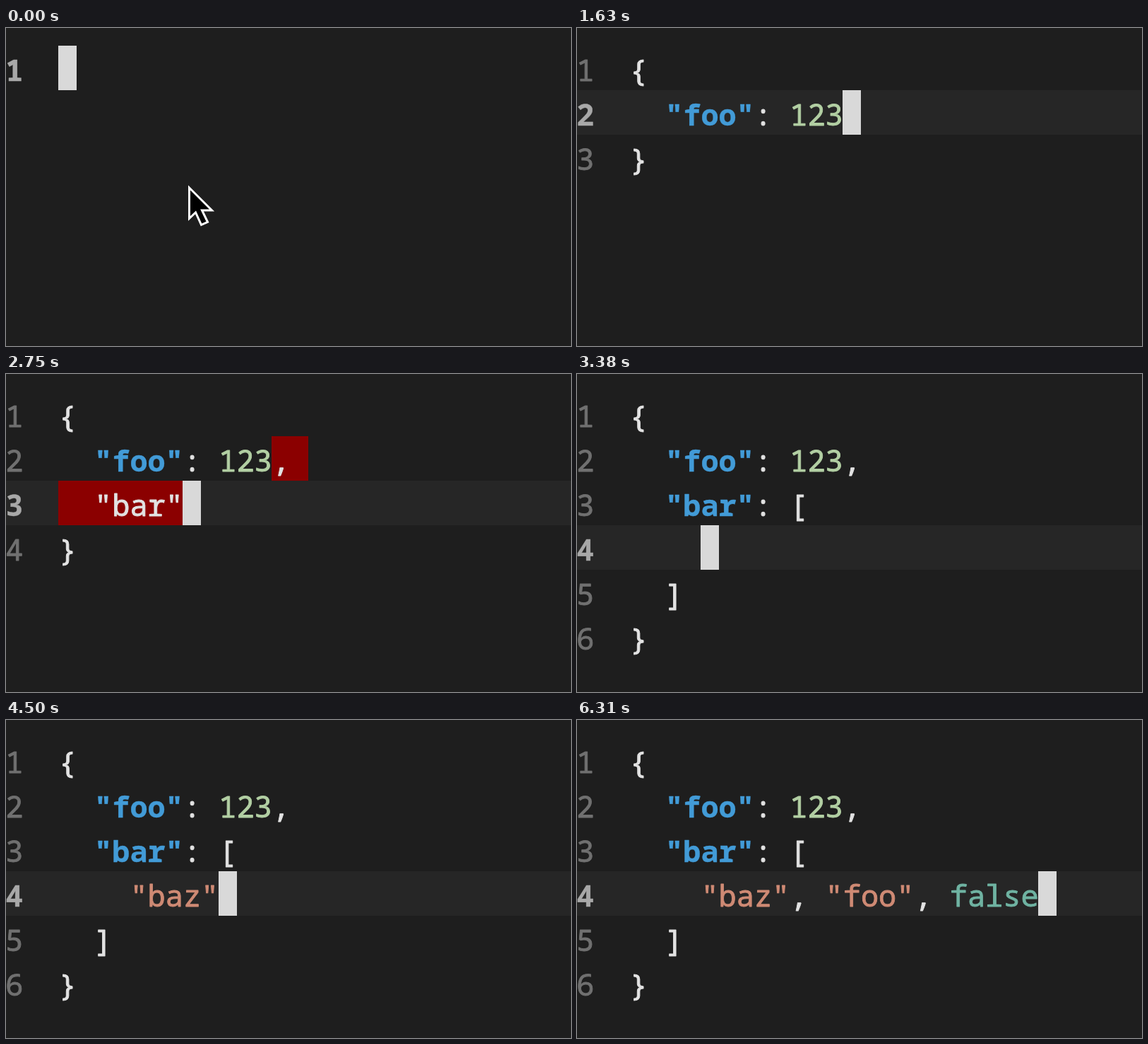
Animation, 800 px wide and 450 px high, one loop 6.49 s. Source, as an HTML page with a canvas:

```html
<!DOCTYPE html>
<html lang="en">
<head>
<meta charset="utf-8">
<title>Typing JSON</title>
<style>
  html, body { margin: 0; width: 100%; height: 100%; overflow: hidden; background: #1e1e1e; }
  canvas { display: block; }
</style>
</head>
<body>
<canvas id="stage" width="800" height="450"></canvas>
<script>
const ctx = document.getElementById('stage').getContext('2d');

const LOOP = 6490;
const CELL = 25.17, LINE = 63, LEFT = 74.3, TOP = 25, BASELINE = 50.3;
const FONT = '41.95px "Noto Sans Mono", monospace';
const COLOR = {
  back: '#1e1e1e', line: '#262626', cursor: '#d9d9d9', error: '#8b0000',
  text: '#e2e2e2', key: '#429bd7', string: '#cf8a74', number: '#b2cfa3', constant: '#6fb3a2',
  lineNumber: '#707070', currentNumber: '#a8a8a8'
};

// [time, keys]: what has been typed by that moment
const KEYS = [
  [130, '{'], [380, '\n'],
  [750, '"'], [880, 'fo'], [1000, 'o'], [1250, '"'], [1380, ':'], [1500, ' 1'], [1630, '23'], [1750, ','],
  [2130, '\n'], [2250, '"'], [2380, 'b'], [2500, 'a'], [2630, 'r'], [2750, '"'],
  [2880, ':'], [3000, ' ['], [3130, '\n'],
  [3880, '"'], [4000, 'b'], [4130, 'a'], [4250, 'z'], [4380, '"'],
  [4630, ','], [4750, ' "'], [4880, 'f'], [5000, 'o'], [5130, 'o'], [5250, '"'],
  [5880, ', '], [6000, 'f'], [6130, 'a'], [6310, 'lse']
];
const CURSOR_OFF = [[3630, 3880], [5630, 5880]];
const PAIRS = { '{': '}', '[': ']', '"': '"' };

const TOKENS = /(?<key>"\w*"(?=:))|(?<string>"\w*")|(?<number>\d+)|(?<constant>false)/g;
const ERRORS = /(,\s*)?"\w*"(?=\n})|,(?=\s*})|, fa?(?=\n)/g;

// Editor with automatic closing pairs and indentation
function typeKey({ before, after }, key) {
  if (key === '"' && after[0] === '"') return { before: before + key, after: after.slice(1) };
  if (key === '\n') {
    const indent = before.split('\n').pop().match(/^ */)[0];
    return /[{[]$/.test(before)
      ? { before: before + '\n' + indent + '  ', after: '\n' + indent + after }
      : { before: before + '\n' + indent, after };
  }
  return { before: before + key, after: (PAIRS[key] || '') + after };
}

function documentAt(time) {
  return KEYS.filter(([start]) => start <= time)
    .flatMap(([, keys]) => [...keys])
    .reduce(typeKey, { before: '', after: '' });
}

function styleCharacters(text) {
  const styles = Array(text.length).fill('text');
  for (const [pattern, fixed] of [[TOKENS], [ERRORS, 'error']]) {
    for (const match of text.matchAll(pattern)) {
      const name = fixed || Object.keys(match.groups).find(group => match.groups[group]);
      styles.fill(name, match.index, match.index + match[0].length);
    }
  }
  return styles;
}

function fillCell(row, column, color) {
  ctx.fillStyle = color;
  ctx.fillRect(Math.round(LEFT + column * CELL), TOP + row * LINE, 26, LINE);
}

// A thin outline gives the letters the weight of enlarged screen text
function drawCharacter(char, row, column, color, bold) {
  const x = LEFT + 0.4 + column * CELL, y = TOP + row * LINE + BASELINE;
  ctx.font = (bold ? 'bold ' : '') + FONT;
  ctx.fillStyle = ctx.strokeStyle = color;
  ctx.lineWidth = bold ? 0.4 : 0.9;
  ctx.lineJoin = 'round';
  ctx.fillText(char, x, y);
  ctx.strokeText(char, x, y);
}

function drawPointer() {
  ctx.beginPath();
  for (const [x, y] of [[259.5, 226], [259.5, 269.5], [268.5, 261], [276.5, 278.5], [285.5, 274.5], [277.5, 258], [291.5, 258]])
    ctx.lineTo(x, y);
  ctx.closePath();
  ctx.fillStyle = '#000';
  ctx.strokeStyle = '#fff';
  ctx.lineWidth = 3;
  ctx.lineJoin = 'miter';
  ctx.fill();
  ctx.stroke();
}

function draw(time) {
  const { before, after } = documentAt(time);
  const text = before + after;
  const styles = styleCharacters(text);
  const cursorRow = before.split('\n').length - 1;
  const cursorColumn = before.split('\n').pop().length;
  const cursorOn = !CURSOR_OFF.some(([start, end]) => time >= start && time < end);

  ctx.fillStyle = COLOR.back;
  ctx.fillRect(0, 0, 800, 450);
  if (cursorRow > 0) {
    ctx.fillStyle = COLOR.line;
    ctx.fillRect(0, TOP + cursorRow * LINE, 800, LINE);
  }

  text.split('\n').forEach((_, row) => {
    const current = row === cursorRow;
    drawCharacter(row + 1, row, -3, current ? COLOR.currentNumber : COLOR.lineNumber, current);
  });

  const cells = [];
  let row = 0, column = 0;
  [...text].forEach((char, i) => {
    cells.push({ char, row, column, style: styles[i] });
    if (char === '\n') { row++; column = 0; } else column++;
  });

  for (const cell of cells)
    if (cell.style === 'error') fillCell(cell.row, cell.column, COLOR.error);
  if (cursorOn) fillCell(cursorRow, cursorColumn, COLOR.cursor);

  for (const { char, row, column, style } of cells) {
    if (char.trim() === '') continue;
    const covered = cursorOn && row === cursorRow && column === cursorColumn;
    const color = covered ? COLOR.back : style === 'error' ? COLOR.text : COLOR[style];
    drawCharacter(char, row, column, color, style === 'key');
  }

  if (time < KEYS[0][0]) drawPointer();
}

const start = performance.now();
function tick() {
  draw((performance.now() - start) % LOOP);
  requestAnimationFrame(tick);
}
tick();
</script>
</body>
</html>
```
